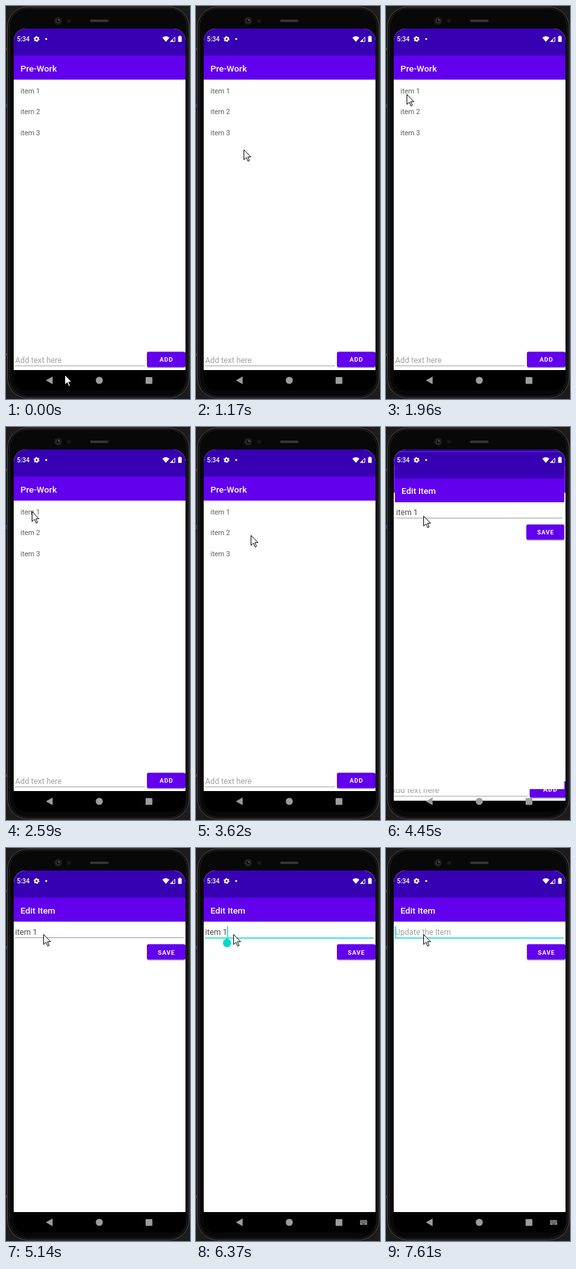
These frames come from a looping animation (286 px wide and 611 px high, 8000 ms). An HTML page:

```html
<!DOCTYPE html>
<html lang="en">
<head>
<meta charset="utf-8">
<title>List editor demo</title>
<style>
html, body { margin: 0; height: 100%; overflow: hidden; background: #1c1c1c; }
svg { display: block; width: 100vw; height: 100vh; }
text { font-family: Roboto, sans-serif; white-space: pre; }
.title { font-size: 13.6px; font-weight: 500; fill: #fff; }
.item { font-size: 10.9px; fill: #5c5c5c; }
.field { font-size: 12.24px; fill: #484848; }
.hint { font-size: 12.24px; fill: #a2a2a2; }
.label { font-size: 9.5px; font-weight: 700; letter-spacing: .85px; fill: #fff; text-anchor: middle; }
</style>
</head>
<body>
<svg viewBox="0 0 286 611">
  <defs>
    <clipPath id="screen"><rect x="12" y="35" width="267" height="563" rx="19"/></clipPath>
    <clipPath id="window"><rect x="12" y="35" width="267" height="531"/></clipPath>
    <g id="chrome">
      <path fill="#fff" d="M12 35h267v531H12z"/>
      <path fill="#3700b3" d="M12 35h267v42H12z"/>
      <path fill="#6200ee" d="M12 77h267v37.5H12z"/>
    </g>
    <g id="button">
      <rect x="219" y="1" width="60" height="24.6" rx="2.7" fill="#000" opacity=".25"/>
      <rect x="219" width="60" height="24" rx="2.7" fill="#6200ee"/>
    </g>
  </defs>

  <!-- phone body -->
  <path fill="#1c1c1c" d="M0 0h286v611H0z"/>
  <path fill="#a33a22" d="M0 65h1v4H0zM0 540h1v4H0z"/>
  <path fill="#2a62a8" d="M0 152h1v6H0z"/>
  <rect x="2.5" y="1.5" width="282" height="608" rx="31" fill="#0b0b0b" stroke="#4c4c4c"/>
  <rect x="5.5" y="4" width="276" height="603" rx="28" fill="#080808" stroke="#242424"/>
  <circle cx="81" cy="23" r="6" fill="#1d1d1d"/>
  <circle cx="81" cy="23" r="3" fill="#070707" stroke="#3a3a3a"/>
  <circle cx="82" cy="22" r=".9" fill="#777"/>
  <circle cx="98" cy="23" r="3" fill="#181818"/>
  <rect x="130.500" y="21" width="29" height="4" rx="2" fill="#303030"/>
  <path d="M132 23h26" stroke="#484848" stroke-dasharray="1 1"/>

  <g clip-path="url(#screen)">
    <path d="M12 35h267v563H12z"/>
    <g id="list">
      <g clip-path="url(#window)">
        <use href="#chrome"/>
        <text class="title" x="22.500" y="101.500">Pre-Work</text>
        <text class="item" x="22.500" y="135.500">item 1</text>
        <text class="item" x="22.500" y="168.100">item 2</text>
        <text class="item" x="22.500" y="200.700">item 3</text>
        <text class="hint" x="14.300" y="555">Add text here</text>
        <path d="M14 559.500h202" stroke="#a0a0a0"/>
        <use href="#button" y="537.500"/>
        <text class="label" x="249.400" y="553">ADD</text>
      </g>
    </g>
    <g id="edit">
      <g clip-path="url(#window)">
        <use href="#chrome"/>
        <text class="title" x="22.500" y="101.500">Edit Item</text>
        <text id="value" x="14.300" y="135"></text>
        <path id="line"/>
        <use href="#button" y="149.500"/>
        <text class="label" x="249.400" y="165.500">SAVE</text>
        <path id="caret" fill="#03dac5" d="M0 121.500h1.400v17.500H0z"/>
        <path id="handle" fill="#03dac5" d="M48.300 140l4.700 3.200a6.500 6.500 0 1 1-9.400 0z"/>
      </g>
    </g>

    <!-- status bar -->
    <text x="17" y="55" font-size="10" font-weight="500" fill="#fff">5:34</text>
    <circle cx="47.500" cy="51.300" r="2.500" fill="none" stroke="#fff" stroke-width="2"/>
    <circle cx="47.500" cy="51.300" r="3.800" fill="none" stroke="#fff" stroke-width="1.500" stroke-dasharray="2 1.980"/>
    <circle cx="62.500" cy="51.300" r="1.500" fill="#fff"/>
    <path fill="#fff" d="M243 49.300q5.500-4.600 11 0l-5.500 6.500z"/>
    <path fill="none" stroke="#fff" d="M255.500 55.300l7-7v7z"/>
    <path fill="#fff" d="M255 55.800l4.500-4.500v4.500zM267.500 47.300h1.500v-1h2.500v1h1.500v8.500h-5.500z"/>

    <!-- navigation bar -->
    <path id="back" fill="#9c9c9c" d="M62 582l10.500-6v12z"/>
    <circle cx="145" cy="582" r="5.500" fill="#9c9c9c"/>
    <rect x="217" y="577" width="10.500" height="10.500" rx="1" fill="#9c9c9c"/>
    <g id="keys">
      <rect x="255" y="578.500" width="11" height="7.500" rx="1" fill="#8c8c8c"/>
      <path d="M256 580.500h9M256 582.500h9" stroke="#111" stroke-dasharray="1 1"/>
      <path d="M258 584.700h5" stroke="#111"/>
    </g>
  </g>
  <path id="mouse" fill="#fff" stroke="#000" stroke-linejoin="round" d="M.5.500v15.500l3.700-3.500 2.600 6 2.300-1-2.600-5.800h4.800z"/>
</svg>
<script>
const LOOP = 8000;
const $ = id => document.getElementById(id);
const set = (id, attrs) => {
  for (const key in attrs) $(id).setAttribute(key, attrs[key]);
};

// each row: start time, then the values held until the next row
const mouse = [
  [0, 91, 573], [500, 128, 468], [650, 141, 284], [1050, 98, 248], [1170, 74, 223],
  [1320, 71, 218], [1440, 69, 215], [1580, 68, 212], [1700, 68, 210],
  [1840, 46, 164], [1960, 32, 137], [2080, 35, 136], [2200, 38, 135], [2320, 40, 135],
  [2460, 40, 133], [2590, 40, 131], [3620, 85, 168], [3750, 86, 168], [3890, 75, 154],
  [4030, 62, 142], [4150, 58, 137], [4450, 58, 138], [4970, 58, 137], [5140, 58, 134]
];
// edit opacity, edit scale, list scale
const screens = [
  [0, 0, 1, 1], [4330, .5, .92, 1.02], [4450, 1, .988, 1.06], [4590, 1, .997, 1.05], [4710, 1, 1, 1]
];
const typed = [[0, "item 1"], [6630, "item "], [6770, "item"], [7060, "ite"], [7340, "it"], [7490, "i"], [7610, ""]];
const carets = [[0, 0], [5420, 1], [5820, 0], [6370, 1]];
const handles = [[0, 0], [5420, .6], [5540, 1], [6630, .4], [6770, 0]];
const turns = [[0, 0], [5540, -45], [5690, -20], [5820, 0]];

const at = (rows, t) => rows.findLast(row => row[0] <= t).slice(1);
const zoom = s => `translate(145.5 317) scale(${s}) translate(-145.5 -317)`;

function draw(t) {
  const [x, y] = at(mouse, t);
  set("mouse", { transform: `translate(${x} ${y})` });

  const [opacity, editScale, listScale] = at(screens, t);
  set("edit", { opacity, transform: zoom(editScale) });
  set("list", { transform: zoom(listScale) });

  const [text] = at(typed, t), value = $("value");
  value.textContent = text;
  value.setAttribute("class", "field");
  const end = 14.3 + (text && value.getComputedTextLength());
  if (!text) {
    value.textContent = "Update the Item";
    value.setAttribute("class", "hint");
  }

  const focus = t >= 5280;
  set("line", focus
    ? { d: "M14 140h262", stroke: "#03dac5", "stroke-width": 1.6 }
    : { d: "M14 139.500h262", stroke: "#979797", "stroke-width": 1 });
  set("caret", { opacity: at(carets, t)[0], transform: `translate(${end} 0)` });
  set("handle", { opacity: at(handles, t)[0] });
  set("back", { transform: `rotate(${at(turns, t)[0]} 68 582)` });
  set("keys", { opacity: t >= 5540 ? 1 : 0 });
}

function tick(now) {
  draw(now % LOOP);
  requestAnimationFrame(tick);
}
draw(0);
requestAnimationFrame(tick);
</script>
</body>
</html>
```
